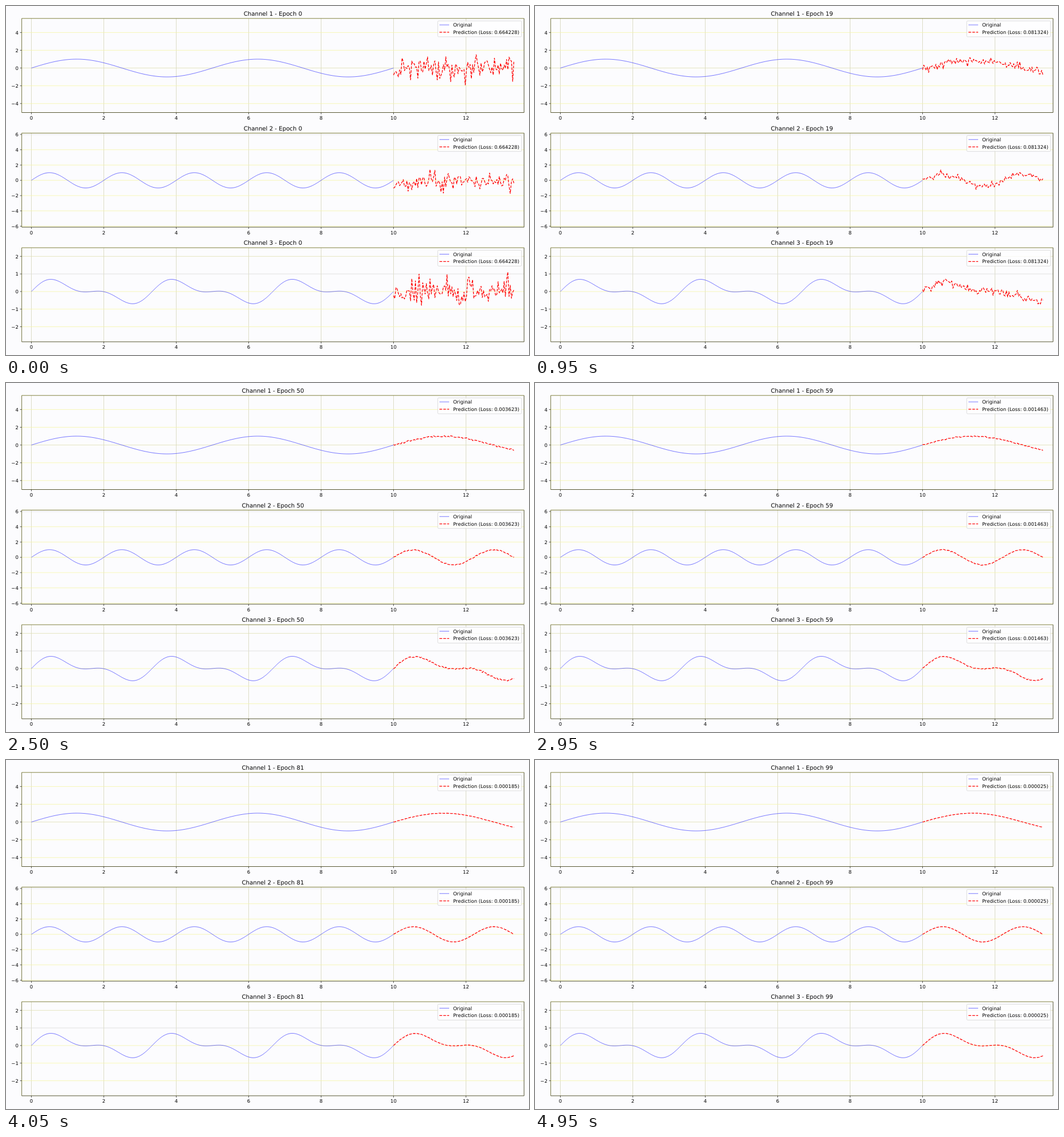
Write an HTML page that moves like this. It is 917 px wide and 611 px high and loops after 5000 ms.

```html
<!DOCTYPE html>
<html lang="en">
<head>
<meta charset="utf-8">
<title>Forecast training</title>
<style>
  html, body { margin: 0; width: 100%; height: 100%; overflow: hidden; background: #fcfcfe; }
  svg { display: block; width: 917px; height: 611px; }
  text { font: 8.49px "DejaVu Sans", sans-serif; fill: #000; text-rendering: geometricPrecision; }
  .title { font-size: 10.19px; }
  .title, .mid { text-anchor: middle; }
  .end { text-anchor: end; }
  path { fill: none; stroke-linejoin: round; }
  .signal { stroke: #00f; stroke-opacity: .6; stroke-width: .9; }
  .forecast { stroke: #f00; stroke-width: 1.27; stroke-dasharray: 4.71 2.04; }
  .tick { stroke: #000; stroke-width: .68; }
  .grid { stroke-width: .8; }
  .legend { fill: #fff; fill-opacity: .8; stroke: #ccc; stroke-opacity: .8; stroke-width: .85; }
</style>
</head>
<body>
<svg id="stage" viewBox="0 0 917 611"></svg>
<script>
const STEP = 50, EPOCHS = 100, POINTS = 100;
const LEFT = 27.6, RIGHT = 908.3, HEIGHT = 164.7;
const TAU = 2 * Math.PI, DECAY = 0.95;
const svg = document.getElementById('stage');

// Known [epoch, loss] points; the rest follow log-linearly.
const LOSSES = [[0, .664228], [19, .081324], [35, .017339], [50, .003623],
                [69, .000534], [81, .000185], [99, .000025]];

const YELLOW = '#f5f5a6', OLIVE = '#dfdfb0', GRAY = '#dadad8';
const channels = [
  { top: 21.8, zero: 108.6, unit: 15.55, sigma: .65, ticks: [-4, -2, 0, 2, 4],
    tint: { 0: OLIVE }, wave: t => Math.sin(TAU * .2 * t) },
  { top: 222.5, zero: 305.2, unit: 13.38, sigma: .55, ticks: [-6, -4, -2, 0, 2, 4, 6],
    tint: { 6: GRAY }, wave: t => Math.sin(TAU * .5 * t) },
  { top: 423.2, zero: 499.9, unit: 30.8, sigma: .36, ticks: [-2, -1, 0, 1, 2],
    tint: { 2: OLIVE, 1: GRAY },
    wave: t => .5 * Math.sin(TAU * .3 * t) + .3 * Math.sin(TAU * .6 * t) }
];

const px = x => 44.5 + 63.5 * x;

function add(tag, attrs, text) {
  const el = document.createElementNS('http://www.w3.org/2000/svg', tag);
  for (const key in attrs) el.setAttribute(key, attrs[key]);
  if (text !== undefined) el.textContent = text;
  return svg.appendChild(el);
}

const line = (x1, y1, x2, y2, attrs) => add('path', { d: `M${x1} ${y1}L${x2} ${y2}`, ...attrs });
const label = (x, y, text, cls = '') => add('text', { x, y, class: cls }, text);

function curve(count, point) {
  let d = '';
  for (let i = 0; i < count; i++) {
    const [x, y] = point(i / (count - 1), i);
    d += (i ? 'L' : 'M') + x.toFixed(2) + ' ' + y.toFixed(2);
  }
  return d;
}

// Seeded normal deviates
function gaussian(seed) {
  let s = Math.imul(seed + 1, 0x9e3779b1);
  const random = () => {
    s = (s + 0x6d2b79f5) | 0;
    let r = Math.imul(s ^ (s >>> 15), 1 | s);
    r = (r + Math.imul(r ^ (r >>> 7), 61 | r)) ^ r;
    return ((r ^ (r >>> 14)) >>> 0) / 4294967296;
  };
  return () => Math.sqrt(-2 * Math.log(1 - random())) * Math.cos(TAU * random());
}

function lossAt(epoch) {
  let i = 1;
  while (LOSSES[i][0] < epoch) i++;
  const [e0, a] = LOSSES[i - 1], [e1, b] = LOSSES[i];
  return a * Math.pow(b / a, (epoch - e0) / (e1 - e0));
}

function buildAxes(ch) {
  const { top, zero, unit } = ch, bottom = top + HEIGHT;

  for (let x = 0; x <= 12; x += 2) {
    line(px(x), top, px(x), bottom, { class: 'grid', stroke: '#d3d3b8' });
    line(px(x), bottom, px(x), bottom + 3, { class: 'tick' });
    label(px(x), bottom + 12.3, x, 'mid');
  }
  for (const v of ch.ticks) {
    const y = zero - v * unit;
    line(LEFT, y, RIGHT, y, { class: 'grid', stroke: ch.tint[v] || YELLOW });
    line(LEFT - 3, y, LEFT, y, { class: 'tick' });
    label(21.8, y + 3.2, String(v).replace('-', '\u2212'), 'end');
  }

  add('path', { class: 'signal', d: curve(300, u => [px(10 * u), zero - unit * ch.wave(10 * u)]) });
  ch.path = add('path', { class: 'forecast' });

  line(LEFT, top, RIGHT, top, { stroke: '#77772c', 'stroke-width': .9 });
  line(LEFT, top, LEFT, bottom, { stroke: '#66662c', 'stroke-width': .9 });
  line(LEFT, bottom, RIGHT, bottom, { stroke: '#44441c', 'stroke-width': .9 });
  line(RIGHT, top, RIGHT, bottom, { stroke: '#44441c', 'stroke-width': .9 });

  ch.title = label(467.9, top - 5, '', 'title');
  add('rect', { class: 'legend', x: 757, y: top + 4.3, width: 147, height: 27.8, rx: 1.7 });
  line(760, top + 11.3, 777, top + 11.3, { class: 'signal' });
  line(760, top + 24.1, 777, top + 24.1, { class: 'forecast' });
  label(783.9, top + 14.4, 'Original');
  ch.note = label(783.9, top + 27.2, '');
}

function showEpoch(epoch) {
  const noise = Math.pow(DECAY, epoch);
  const learned = 1 - Math.pow(noise, 1.5);
  const loss = lossAt(epoch).toFixed(6);
  channels.forEach((ch, n) => {
    const next = gaussian(epoch * 3 + n);
    ch.path.setAttribute('d', curve(POINTS, u => {
      const v = learned * ch.wave(3 * u) + noise * ch.sigma * next();
      return [px(10 + 3.323 * u), ch.zero - ch.unit * v];
    }));
    ch.title.textContent = `Channel ${n + 1} - Epoch ${epoch}`;
    ch.note.textContent = `Prediction (Loss: ${loss})`;
  });
}

channels.forEach(buildAxes);
const start = performance.now();
let shown = -1;

function tick() {
  const epoch = Math.floor((performance.now() - start) / STEP) % EPOCHS;
  if (epoch !== shown) showEpoch(shown = epoch);
  requestAnimationFrame(tick);
}
tick();
</script>
</body>
</html>
```
